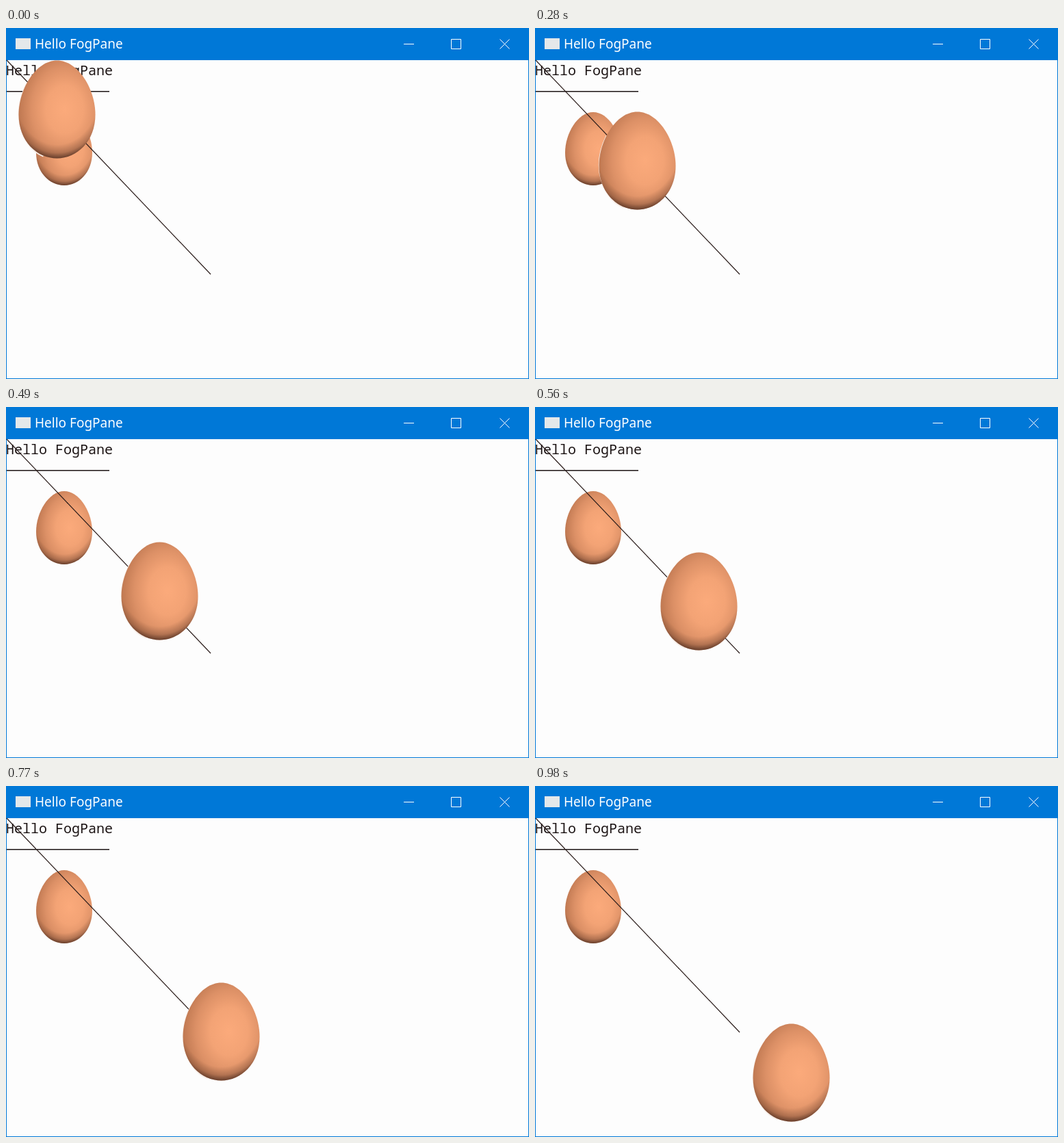
Recreate the animation shown at these times as an HTML page. Size 764 by 513 pixels, loop 1050 ms.

```html
<!DOCTYPE html>
<html lang="en">
<head>
<meta charset="utf-8">
<title>Hello FogPane</title>
<style>
  html, body { margin: 0; width: 100%; height: 100%; overflow: hidden; }
  svg { display: block; }
  .title { font: 19px "Noto Sans", "Open Sans", sans-serif; fill: #fff; }
  .mono { font: 20px "Noto Sans Mono", monospace; fill: #1c1414; }
</style>
</head>
<body>
<svg width="764" height="513" viewBox="0 0 764 513">
  <defs>
    <radialGradient id="shell" cx=".6" cy=".5" r=".7">
      <stop offset="0" stop-color="#fbaa7b"/>
      <stop offset=".35" stop-color="#f3a375"/>
      <stop offset=".62" stop-color="#dc9066"/>
      <stop offset="1" stop-color="#ae6a45"/>
    </radialGradient>
    <radialGradient id="shade" cx=".5" cy=".3" r=".7">
      <stop offset=".8" stop-color="#3c2118" stop-opacity="0"/>
      <stop offset=".92" stop-color="#3c2118" stop-opacity=".25"/>
      <stop offset="1" stop-color="#3c2118" stop-opacity=".7"/>
    </radialGradient>
    <path id="outline" d="M56 0C87 0 112 42 112 79C112 118 85 143 56 143C27 143 0 118 0 79C0 42 25 0 56 0Z"/>
    <g id="egg">
      <use href="#outline" fill="url(#shell)"/>
      <use href="#outline" fill="url(#shade)"/>
    </g>
  </defs>

  <rect width="764" height="513" fill="#0078d7"/>
  <rect x="1" y="47" width="762" height="465" fill="#fdfdfd"/>

  <rect x="14" y="15" width="22" height="16" fill="#e4e8ea"/>
  <text class="title" x="42" y="30">Hello FogPane</text>
  <path d="M581 23.5H596M650.5 16.5H664.5V30.5H650.5ZM721.5 16.5L735.5 30.5M735.5 16.5L721.5 30.5" fill="none" stroke="#fff"/>

  <text class="mono" x="0" y="69">Hello FogPane</text>
  <use href="#egg" transform="translate(44 123) scale(.732 .748)"/>
  <path d="M1 92.7H151" stroke="#1c1414" stroke-width="1.6"/>
  <path d="M1 47L299 360" stroke="#2a1c1a" stroke-width="1.2"/>

  <g id="mover">
    <path d="M11 35C-4 66 -3 96 14 122C20 131 28 137 36 140" fill="none" stroke="#f6ece6" stroke-width="2"/>
    <use href="#egg"/>
  </g>
</svg>
<script>
  const LOOP = 1050, TICK = 70, STEP = 15;
  const mover = document.getElementById("mover");

  // The egg moves in whole steps, about 1.46 of them per screen update.
  function draw(now) {
    const tick = Math.floor((now % LOOP) / TICK);
    const shift = STEP * Math.floor(tick * 1.46 + 0.05);
    mover.setAttribute("transform", `translate(${18.5 + shift} ${47.5 + shift})`);
    requestAnimationFrame(draw);
  }
  draw(0);
</script>
</body>
</html>
```
